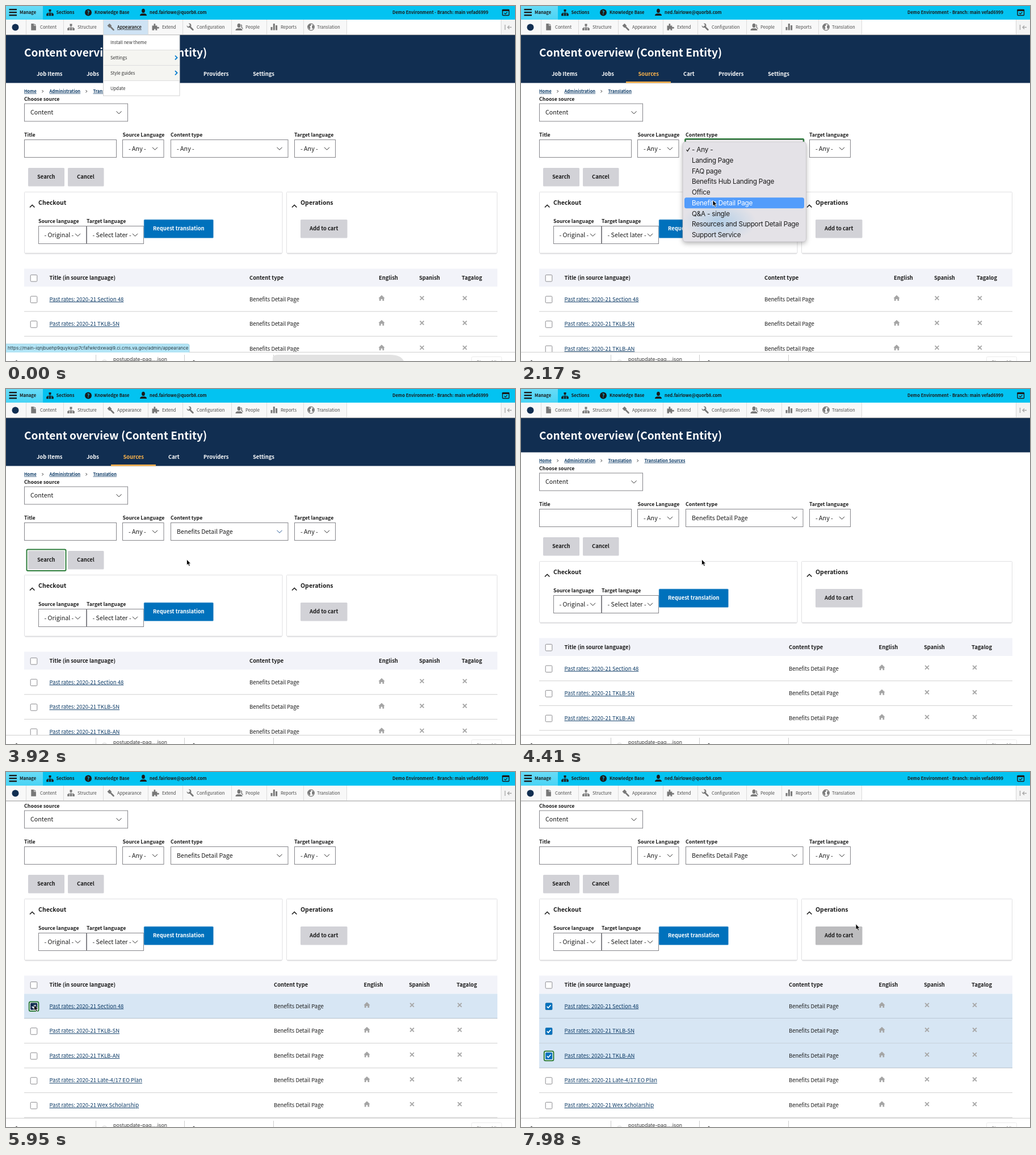
These frames come from a looping animation (897x625 px, 8 s). An HTML page:

```html
<!DOCTYPE html>
<html lang="en">
<head>
<meta charset="utf-8">
<title>Content overview</title>
<style>
html, body { margin: 0; width: 100%; height: 100%; overflow: hidden; background: #fff; }
svg { display: block; width: 897px; height: 625px; }
text { font-family: "Noto Sans CJK JP", "Noto Sans CJK SC", "Noto Sans CJK", "Open Sans", sans-serif; white-space: pre; }
text.ui { font-family: Inter, "Liberation Sans", sans-serif; }
</style>
</head>
<body>
<svg id="stage" viewBox="0 0 897 625"></svg>
<script>
const LOOP = 8000, STEP = 70;
const INK = '#1b1b1b', NAVY = '#112e51', BLUE = '#0071bc', GREEN = '#2e7d3c', GREY = '#d2d2d7';

// ---- drawing helpers; text is placed by the middle of its capitals ----
const rect = (x, y, w, h, fill, more = '') =>
  `<rect x="${x}" y="${y}" width="${w}" height="${h}" fill="${fill}" ${more}/>`;
const line = (d, color = INK, w = 1, more = '') =>
  `<path d="${d}" fill="none" stroke="${color}" stroke-width="${w}" ${more}/>`;
const shape = (d, fill) => `<path d="${d}" fill="${fill}"/>`;
const at = (x, y, body, more = '') => `<g transform="translate(${x} ${y})" ${more}>${body}</g>`;
const text = (x, y, str, size = 10.67, fill = INK, more = '') =>
  `<text x="${x}" y="${y + size * 0.33}" font-size="${size / 1.12}" fill="${fill}" ${more}>${str}</text>`;
const bold = (x, y, str, size = 10.67, fill = INK, more = '') =>
  text(x, y, str, size * 0.985, fill, 'font-weight="600" ' + more);
const ui = (x, y, str, size, fill = INK, more = '') =>
  `<text class="ui" x="${x}" y="${y + size * 0.36}" font-size="${size}" fill="${fill}" ${more}>${str}</text>`;
const link = 'text-decoration="underline"';
const hidden = id => `id="${id}" visibility="hidden"`;

// ---- page parts ----
const chevron = (x, y, color = '#2a2a2a') => line(`M${x - 4.5} ${y - 2.2}l4.5 4.5l4.5 -4.5`, color, 1);
const field = (x, y, w) => rect(x + .5, y + .5, w - 1, 31, '#fff', 'stroke="#85858a"');
const select = (x, y, w, label, tx, cx) =>
  field(x, y, w) + text(tx, y + 16, label, 12) + chevron(cx, y + 16);
const button = (x, y, w, label, tx, id, fill = GREY, color = INK, more = '') =>
  rect(x, y, w, 32.5, fill, `rx="1.5" id="${id}" ${more}`) + bold(tx, y + 16, label, 10.67, color);
const card = (x, w, label) =>
  rect(x + 1, 330, w - 2, 107, '#e4e4e6', 'rx="2"') +
  rect(x + .5, 327.5, w - 1, 107.5, '#fff', 'stroke="#e0e0e2" rx="1"') +
  line(`M${x + 10} 354.5l4.2 -4.2l4.2 4.2`, INK, 1.6) + bold(x + 25, 346.5, label, 12);
const box = y => rect(43.2, y - 5.6, 11.6, 11.6, '#fff', 'stroke="#8a8a8e" rx="1.5"');
const home = (x, y) => shape(`M${x} ${y - 5.5}l5.6 5.3h-1.4v4.7h-2.8v-3.2h-2.8v3.2h-2.8v-4.7h-1.4z`, '#a5a5a5');
const cross = (x, y) => line(`M${x - 3.4} ${y - 3.4}l6.8 6.8m0 -6.8l-6.8 6.8`, '#a8a8a8', 1.9);

const rows = ['Section 48', 'TKLB-SN', 'TKLB-AN', 'Late-4/17 EO Plan', 'Wex Scholarship'];
const rowY = i => 516.1 + 43.6 * i;

function table([type, en, es, tl], homeX, esX, tlX, checks) {
  let s = rect(32, 462.5, 834, 31.5, '#f2f3f9') + box(479) + bold(76.5, 478.7, 'Title (in source language)') +
    bold(type, 478.7, 'Content type') + bold(en, 478.7, 'English') + bold(es, 478.7, 'Spanish') + bold(tl, 478.7, 'Tagalog');
  rows.forEach((name, i) => {
    const y = rowY(i);
    if (checks) s += rect(32, y - 21.7, 834, 43.6, '#d7e6f4', hidden('mark' + i));
    s += line(`M32 ${y + 21.7}H866`, '#000', 1, 'opacity=".19"') + box(y + .5) +
      text(76.5, y, 'Past rates: 2020-21 ' + name, 10.67, '#0b3a66', link) +
      text(type, y, 'Benefits Detail Page') + home(homeX, y - 1.5) + cross(esX, y - 1.8) + cross(tlX, y - 1.8);
    if (checks) s += at(49, y + .5,
      rect(-8.2, -8.2, 16.6, 16.6, '#fff', `rx="2.5" stroke="${GREEN}" stroke-width="2" ` + hidden('ring' + i)) +
      `<g ${hidden('tick' + i)}>` + rect(-6, -6, 12.2, 12.2, BLUE, `rx="1.5" id="fill${i}"`) +
      line('M-3.3 .2l2.4 2.5l4.3 -5', '#fff', 1.7) + '</g>');
  });
  return s;
}

const form = (p, type) =>
  bold(32, 163.5, 'Choose source', 10) + select(32, 171.5, 183, 'Content', 43, 199) +
  bold(32, 226.5, 'Title', 10) + field(32, 235, 163) +
  bold(205.5, 226.5, 'Source Language', 10) + select(205, 235, 73.5, '- Any -', 216, 262.5) +
  bold(290, 226.5, 'Content type', 10) + select(290, 235, 207.5, type, 301, 482) +
  bold(508, 226.5, 'Target language', 10) + select(508, 235, 73, '- Any -', 519, 565.5) +
  button(39, 285, 64, 'Search', 55, p + 'Search') + button(109, 285, 63.5, 'Cancel', 125, p + 'Cancel') +
  card(32, 455.5, 'Checkout') + card(494, 372, 'Operations') +
  bold(57, 378.5, 'Source language', 10) + select(57, 387, 85, '- Original -', 67.5, 126.5) +
  bold(142, 378.5, 'Target language', 10) + select(142, 387, 101, '- Select later -', 152.5, 227.5) +
  button(243, 376, 122.5, 'Request translation', 259, p + 'Request', BLUE, '#fff', 'stroke="#8dbde0" stroke-width=".7"') +
  button(519, 376, 82.5, 'Add to cart', 535, p + 'Add');

function crumbs(y, items) {
  return items.map(([x, name], i) =>
    bold(x, y, name, 8.45, '#0b3a66', link) + (i ? line(`M${x - 13} ${y - 2}l2.2 2.2l-2.2 2.2`, INK, .9) : '')).join('');
}
const trail = [[32, 'Home'], [76.5, 'Administration'], [153.5, 'Translation'], [217.5, 'Translation Sources']];
const banner = h => rect(0, 51, 897, h, NAVY) + bold(32, 82, 'Content overview (Content Entity)', 21.7, '#fff');

const tabs = [[54, 'Job Items'], [142, 'Jobs'], [206.5, 'Sources'], [286, 'Cart'], [348, 'Providers'], [435, 'Settings']];
const pageA = banner(84.5) +
  tabs.map(([x, n]) => bold(x, 119.5, n, 10.67, n === 'Sources' ? '#fdb44b' : '#fff')).join('') +
  rect(185, 133, 79, 2.5, '#fdb44b') + crumbs(150, trail.slice(0, 3)) + form('a', '- Any -') +
  `<g ${hidden('picked')}>` + rect(293, 238, 200, 26, '#fff') + text(301, 251, 'Benefits Detail Page', 12) +
  chevron(482, 251, '#205493') + '</g>' +
  rect(289.2, 234.2, 209, 33.6, 'none', `stroke="${GREEN}" stroke-width="2.2" rx="1.5" ` + hidden('focusType')) +
  rect(36.5, 282.5, 69, 37.5, 'none', `stroke="${GREEN}" stroke-width="2" rx="2" ` + hidden('focusSearch')) +
  table([429, 657, 728, 803], 662, 733, 808.5);
const pageB = banner(60.5) + crumbs(126, trail) +
  at(0, -24, form('b', 'Benefits Detail Page') + table([472, 630.5, 710, 794], 636, 715.5, 799.5, true));

// ---- admin toolbar ----
const G = '#787878';
const sitemap = c => line('M0 -2v3M-4.5 3v-2h9v2M0 1v2', c, 1) + rect(-2, -5.5, 4, 3.8, c) +
  [-6.3, -1.8, 2.7].map(x => rect(x, 2, 3.6, 3.8, c)).join('');
const person = c => `<ellipse cy="-2.6" rx="2.9" ry="3.6" fill="${c}"/>` + shape('M-6 6q0 -3.3 3.8 -3.8h4.4q3.8 .5 3.8 3.8z', c);
const wrench = line('M-1 -1L4.8 4.8', G, 2.8, 'stroke-linecap="round"') +
  shape('M-6 -3l2.5 2.5l3 -.3l.3 -3l-2.5 -2.5q4.2 -.6 4.6 3.2t-3.6 4.3t-4.3 -4.2z', G);
const icons = {
  Content: shape('M-4.2 -6h5v3.8h3.6v8h-8.6zM1.7 -6l2.7 2.9h-2.7z', G),
  Structure: sitemap(G),
  Appearance: line('M-.5 -.5L5 5', G, 2.6, 'stroke-linecap="round"') + shape('M-6 -2.6l4 -3.6l3.8 4l-4 3.6z', G),
  Extend: shape('M-6 -2.5h3.4q-1.4 -3.5 1 -3.5t1 3.5h3.4v2.8q3.6 -1.4 3.6 1t-3.6 1v3.5h-3q.8 -2.6 -1 -2.6t-1 2.6h-3.8z', G),
  Configuration: wrench,
  People: person(G) + line('M3.5 -4q2.4 1 .8 4.4q2 .6 2.4 3', G, 1.4),
  Reports: rect(-6, 0, 3, 5.5, G) + rect(-1.7, -6, 3, 11.5, G) + rect(2.6, -3, 3, 8.5, G),
  Translation: `<circle r="5.8" fill="#fff" stroke="${G}" stroke-width="1.3"/>` +
    shape('M-5.5 -2l3 -3l3 .4l-1 2.6l-2 1l1.6 2l-1 3.4q-3.6 -2 -3.6 -6.4zM2 -3.4l3 .8l.4 3.4l-2.4 3l-1.4 -3z', G)
};
const tray = [[36, 60], [102, 126], [172, 196], [251, 275], [312, 336], [398, 422], [460, 484], [525, 548], [601]];

let bar = rect(0, 24, 897, 27, '#fff') + rect(0, 24, 601, 26.5, '#f8f8f8') + rect(872, 24, 25, 26.5, '#f4f4f4') +
  line('M0 50.7H897', '#b4b4b4') + line('M0 51.7H897', '#000', 1, 'opacity=".15"') + line('M872.5 24V50', '#d5d5d5') +
  rect(172, 24, 79, 26.5, '#cfe3f4', 'id="hotTray"') +
  `<circle cx="16.5" cy="37.5" r="6" fill="${NAVY}"/>`;
Object.keys(icons).forEach((n, i) => {
  bar += at(tray[i][0] + 12.5, 37, icons[n]) + text(tray[i][1], 37.5, n, 8.67, '#4c4c4c');
});
bar += tray.map(([x]) => line(`M${x - .5} 24V50`, '#dcdcdc')).join('') +
  line('M879.5 33v9M891 37.5h-7m3 -3l-3 3l3 3', '#a9a9a9', 1.4) +
  rect(0, 0, 897, 24, '#03c3f1') + rect(0, 0, 65, 24, 'url(#shine)') +
  [5, 10, 15].map(y => rect(5.5, y, 13.5, 2.4, INK)).join('') +
  at(77.5, 11.5, sitemap(INK)) +
  '<circle cx="145" cy="11.5" r="6" fill="#1b1b1b"/>' + bold(142.7, 11.6, '?', 10, '#03c3f1') +
  at(242, 11, person(INK)) +
  rect(875, 6.5, 11.5, 10, 'none', `stroke="${INK}" stroke-width="1.4" rx="1"`) + rect(874.5, 6, 12.5, 3, INK) +
  line('M878 12.2l2 2l3.4 -3.6', INK, 1.2) +
  [[24, 'Manage'], [88.5, 'Sections'], [156, 'Knowledge Base'], [253, 'ned.fairlowe@quorb8.com'],
   [681, 'Demo Environment - Branch: main vefad6999']].map(([x, n]) => bold(x, 11.5, n, 8.67)).join('');

const flyout = rect(171.5, 51, 134.5, 107, '#fff', 'stroke="#d2d2d2"') + rect(172, 78, 133.5, 53, '#f5f5f1') +
  line('M172 77.5H306M172 104.5H306M172 131.5H306', '#dedede') +
  ['Install new theme', 'Settings', 'Style guides', 'Update'].map((n, i) =>
    text(184, 64.2 + 26.9 * i, n, 8.67, '#333')).join('') +
  line('M298 87.3l3.6 3.6l-3.6 3.6M298 114.2l3.6 3.6l-3.6 3.6', '#0a7fd0', 1.9) +
  text(196, 37.5, 'Appearance', 8.67, INK, link);

// ---- browser and system parts ----
const shelf = rect(0, 609.5, 897, 16, '#fff') + line('M0 609.5H897', '#cfcfcf') +
  line('M158.5 614V625M314.5 614V625M471.5 614V625', '#cdcdcd') +
  ui(189, 622, 'postupdate-pag....json', 8.9, '#3c3c3c') +
  line('M169 626a5 5 0 0 1 9 0', '#d5d5d5') + line('M17 625.5l1.5 -1.5l1.5 1.5M329.5 625.5l1.5 -1.5l1.5 1.5', '#555', 1.2) +
  rect(820.5, 617.5, 53, 16, '#fff', 'stroke="#ececec" rx="2"') + ui(829, 628, 'Show All', 8.6, '#777');
const strip = shape('M470 625V619Q471 614 480 614H676Q696 614 701 625Z', '#e2e2e2');
const bubble = shape('M0 595H320Q323 595 323 598V610H0Z', '#b3e5f6') + line('M0 595H320Q323 595 323 598V610', '#98c9da', .8) +
  ui(3, 602.3, 'https://main-iqnjbuehp9quykxup7cfafwkrdxwaqi9.ci.cms.va.gov/admin/appearance', 8.05, '#2c3c44');

const kinds = ['- Any -', 'Landing Page', 'FAQ page', 'Benefits Hub Landing Page', 'Office', 'Benefits Detail Page',
  'Q&amp;A - single', 'Resources and Support Detail Page', 'Support Service'];
const itemY = i => 253 + 18.75 * i;
const popup = rect(285, 239, 217.5, 176, '#e4e2e7', 'rx="5" filter="url(#shadow)"') +
  rect(285, 345, 130, 70, 'url(#glow)', 'rx="5"') + rect(285, 239, 217.5, 176, 'none', 'rx="5" stroke="#bdbbc0" stroke-width=".7"') +
  rect(288, 0, 211, 18.8, '#529cfb', 'rx="3.5" id="hot"') +
  kinds.map((n, i) => ui(301, itemY(i), n, 11.8, INK, `letter-spacing="-.25" id="item${i}"`)).join('') +
  line('M291.5 253l2 2.6l3.8 -6', INK, 1.2, 'id="chosen"');

const arrow = `<path d="M0 0V10.2L2.3 8.1L4 11.9L5.8 11.1L4.2 7.4H7.2Z" fill="#000" stroke="#fff" stroke-width=".8"/>`;
const hand = `<path d="M-1.2 .8Q-1.2 -.4 0 -.4T1.2 .8V4Q3 3.3 3.4 4.6Q5 4.2 5.3 5.4Q6.8 5.2 6.8 6.6V8.6Q6.6 10.6 5.6 12H.2Q-1 10 -3.6 7.4Q-4 5.8 -2.4 6L-1.2 7Z" fill="#fff" stroke="#111" stroke-width=".9"/>`;

stage.innerHTML = `<defs>
  <linearGradient id="shine" x2="0" y2="1"><stop stop-color="#fff" stop-opacity=".4"/><stop offset="1" stop-color="#fff" stop-opacity=".28"/></linearGradient>
  <radialGradient id="glow"><stop stop-color="#a9cbe8" stop-opacity=".8"/><stop offset="1" stop-color="#a9cbe8" stop-opacity="0"/></radialGradient>
  <filter id="shadow" x="-10%" y="-10%" width="120%" height="125%"><feDropShadow dx="0" dy="3" stdDeviation="4" flood-opacity=".3"/></filter>
</defs>` + rect(0, 0, 897, 625, '#fff') +
  `<g id="pageA">${pageA}</g><g id="pageB">${pageB}</g>` + bar + `<g id="flyout">${flyout}</g>` +
  rect(892.3, 32, 4.7, 248, '#7d7d7d', 'rx="2" id="thumb"') + shelf +
  `<g id="strip">${strip}</g><g id="bubble">${bubble}</g><g id="popup">${popup}</g>` +
  `<g id="cursor"><g id="arrow">${arrow}</g><g id="hand">${hand}</g></g>`;

// ---- motion ----
const path = [[70, 536, 542], [210, 536, 542], [840, 337, 249], [1470, 337, 249], [1540, 341, 253], [1610, 341, 253],
  [1960, 340, 322], [2030, 340, 322], [2170, 338, 342], [2310, 338, 342], [2380, 330, 343], [2520, 330, 343],
  [2870, 94, 309], [3850, 94, 309], [3920, 318.5, 300], [4970, 318.5, 300], [5250, 98, 384], [5390, 98, 384],
  [5670, 49.5, 410], [6090, 49.5, 410], [6440, 49.5, 454], [7000, 49.5, 454], [7210, 49.5, 497], [7420, 49.5, 497],
  [7630, 180, 452], [7770, 180, 452], [7840, 545, 280], [7980, 590, 267.5]];
const scrolls = [[4690, 0], [4760, 22], [4830, 62], [4900, 80]];
const fades = [[210, 1], [560, 0]];
const thumbFade = [[5390, 1], [5670, 0]];

function tween(keys, t) {
  if (t <= keys[0][0]) return keys[0].slice(1);
  const i = keys.findIndex(k => k[0] > t);
  if (i < 0) return keys[keys.length - 1].slice(1);
  const a = keys[i - 1], b = keys[i], u = (t - a[0]) / (b[0] - a[0]), e = u * u * (3 - 2 * u);
  return a.slice(1).map((v, j) => v + (b[j + 1] - v) * e);
}
const $ = id => document.getElementById(id);
const set = (id, name, value) => $(id).setAttribute(name, value);
const show = (id, on) => set(id, 'visibility', on ? 'visible' : 'hidden');
const clicks = [5810, 6650, 7350];

function render(t) {
  const [x, y] = tween(path, t), [scroll] = tween(scrolls, t);
  const second = t >= 4060, open = t >= 1260 && t < 2590;
  const shift = second ? -24 - scroll : 0;
  const over = (bx, by, w, h) => t >= 70 && x >= bx && x <= bx + w && y >= by + shift && y <= by + shift + h;

  set('pageA', 'display', second ? 'none' : 'inline');
  set('pageB', 'display', second ? 'inline' : 'none');
  set('pageB', 'transform', `translate(0 ${-scroll})`);
  set('flyout', 'display', t < 70 ? 'inline' : 'none');
  set('hotTray', 'display', t < 70 ? 'inline' : 'none');
  set('bubble', 'opacity', tween(fades, t)[0]);
  set('strip', 'opacity', tween(fades, t)[0]);
  set('thumb', 'opacity', scroll ? tween(thumbFade, t)[0] : 0);
  set('thumb', 'y', 32 - (80 - scroll) * .4);

  set('popup', 'display', open ? 'inline' : 'none');
  const hot = Math.max(0, Math.min(8, Math.round((y - 253) / 18.75)));
  set('hot', 'y', itemY(hot) - 9.4);
  kinds.forEach((_, i) => set('item' + i, 'fill', i === hot ? '#fff' : INK));
  set('chosen', 'stroke', hot ? INK : '#fff');
  show('picked', !second && t >= 2590);
  show('focusType', !second && t >= 1260 && t < 3150);
  show('focusSearch', !second && t >= 3150);

  const search = !second && over(39, 285, 64, 33);
  const request = second && over(243, 376, 122, 32.5);
  const pointing = search || request && t >= 4900;
  set('aSearch', 'fill', search ? '#bcbcbe' : GREY);
  set('bRequest', 'fill', request ? '#205493' : BLUE);
  set('bAdd', 'fill', second && t >= 7840 ? '#bcbcbe' : GREY);

  rows.forEach((_, i) => {
    const on = second && t >= clicks[i];
    ['mark', 'tick'].forEach(k => show(k + i, on));
    show('ring' + i, on && !(t >= clicks[i + 1]));
    set('fill' + i, 'fill', over(42, rowY(i) - 8, 14, 16) ? NAVY : BLUE);
  });

  set('cursor', 'display', t < 70 ? 'none' : 'inline');
  set('cursor', 'transform', `translate(${x} ${y})`);
  show('hand', pointing);
  show('arrow', !pointing);
}

let last = -1;
function tick(now) {
  const t = Math.floor(now % LOOP / STEP) * STEP;
  if (t !== last) render(last = t);
  requestAnimationFrame(tick);
}
render(0);
requestAnimationFrame(tick);
</script>
</body>
</html>
```
